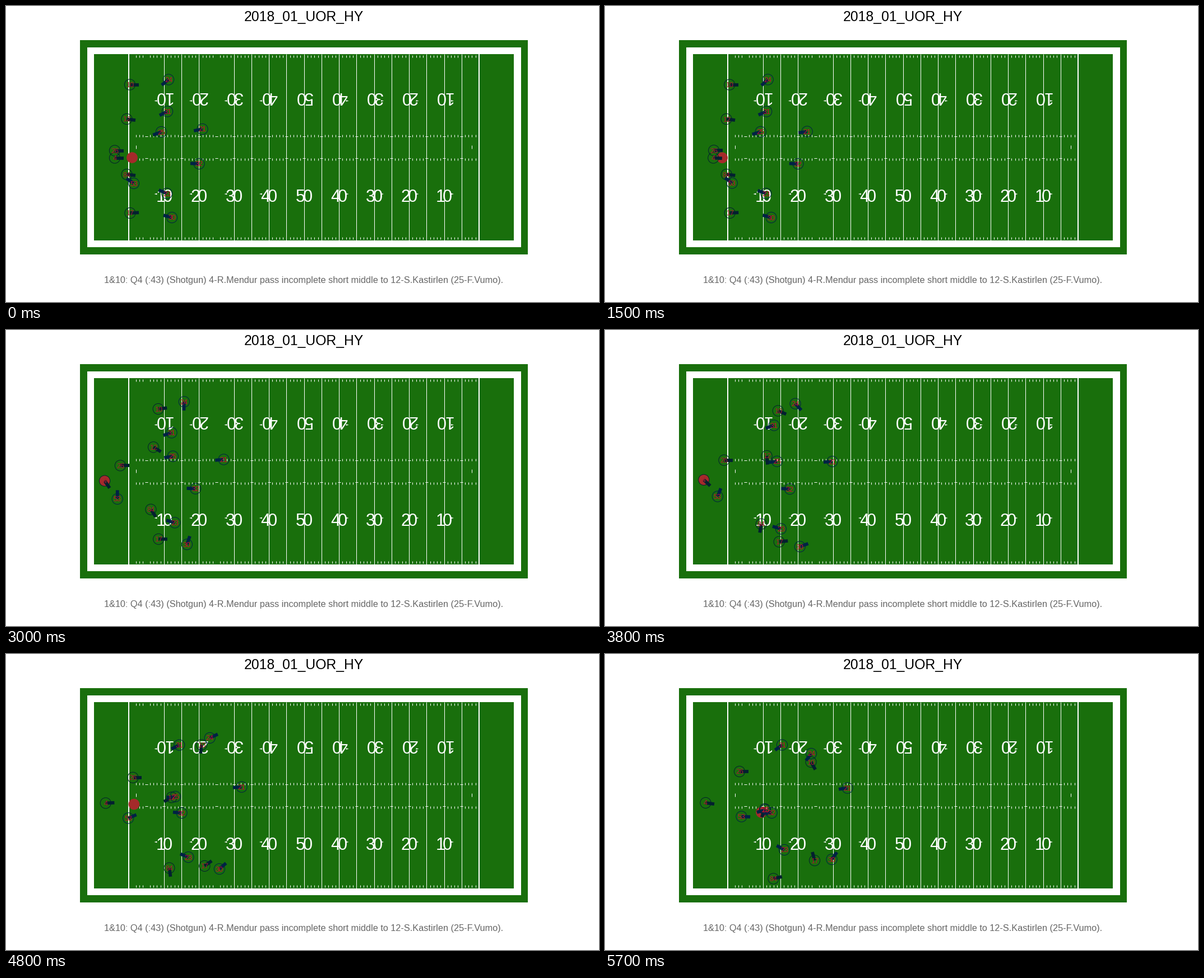
Write a matplotlib script that moves like this. It is 1058 by 529 pixels and loops after 5800 ms.

```python
import numpy as np
import matplotlib.pyplot as plt
from matplotlib.animation import FuncAnimation
from matplotlib.patches import Circle, Polygon, Rectangle

W, H, DPI = 1058, 529, 64
FRAMES, STEP = 58, 100
SNAP, THROW, DROP = 13, 44, 52     # moments of the play, in frames
PT = 72 / DPI                      # points per pixel
YARD = 6.245
GREEN, BROWN = "#196f0c", "#a52a2a"
HOME = ("#002244", "#c60c30")
AWAY = ("#03202f", "#a71930")
K = np.arange(FRAMES)

plt.rcParams["font.family"] = "Liberation Sans"
fig = plt.figure(figsize=(W / DPI, H / DPI), dpi=DPI, facecolor="white")
ax = fig.add_axes([0, 0, 1, 1])
ax.set_xlim(0, W)
ax.set_ylim(H, 0)
ax.axis("off")


def fx(yards):
    return 157 + np.asarray(yards) * YARD


def fy(yards):
    return 419 - np.asarray(yards) * YARD


def field_rect(margin, color):
    x, y = fx(-margin), fy(53.3 + margin)
    ax.add_patch(Rectangle((x, y), fx(120 + margin) - x, fy(-margin) - y,
                           fc=color, lw=0, zorder=0))


def text(x, y, s, px, color, **kw):
    opts = dict(ha="center", va="baseline", rotation_mode="anchor", zorder=2)
    opts.update(kw)
    return ax.text(x, y, s, fontsize=px * PT, color=color, **opts)


def vlines(xs, y0, y1, width=1):
    ax.vlines(xs, y0, y1, color="white", lw=width * PT, zorder=1)


def draw_field():
    for margin, color in ((4, GREEN), (2, "white"), (0, GREEN)):
        field_rect(margin, color)

    vlines(fx([y for y in range(20, 110, 5) if y != 35]), 86, 419)
    vlines(fx([10, 110]), 86, 419, 2)

    ticks = fx([y for y in range(12, 110) if y % 5])
    for top in (88, 229.5, 271.5, 413):
        vlines(ticks, top, top + 4)
    vlines(fx([12, 108]), 249, 255)
    fives = fx(np.arange(15, 110, 5))
    for y in (233, 272):
        ax.hlines([y] * len(fives), fives - 2.5, fives + 2.5,
                  color="white", lw=PT, zorder=1)

    for yard in range(20, 101, 10):
        x = float(fx(yard))
        tens = str(min(yard - 10, 110 - yard) // 10)
        for digit, dx in ((tens, -YARD), ("0", YARD)):
            text(x + dx, 350.5, digit, 30.5, "white")
            text(x - dx, 154.5, digit, 30.5, "white", rotation=180)
        side = np.sign(yard - 60)
        if side:
            base, tip = x + side * 2 * YARD, x + side * 2.8 * YARD
            for y in (169.5, 336):
                ax.add_patch(Polygon([(base, y - 1.4), (base, y + 1.4), (tip, y)],
                                     fc="white", lw=0, zorder=1))


def glide(points, start=SNAP):
    """Hold the first point, then pass the rest at even times on a smooth curve."""
    p = np.array(points, float)
    m = np.gradient(p, axis=0)
    m[0] = 0
    t = np.clip((K - start) / (FRAMES - 1 - start), 0, 1) * (len(p) - 1)
    i = np.minimum(t.astype(int), len(p) - 2)
    s = (t - i).reshape((-1,) + (1,) * (p.ndim - 1))
    return ((1 + 2 * s) * (1 - s) ** 2 * p[i] + s * (1 - s) ** 2 * m[i]
            + s * s * (3 - 2 * s) * p[i + 1] + s * s * (s - 1) * m[i + 1])


def ball_path(qb):
    """Snap to the passer, carry, then a straight throw that falls at the end."""
    spot, fall = np.array([225, 271]), np.array([279, 283])
    snap = np.clip((K - SNAP + 1) / 6, 0, 1)[:, None]
    fly = np.clip((K - THROW) / (DROP - THROW), 0, 1)
    fly = np.stack([fly, fly ** 3], axis=1)
    held = spot + (qb - spot) * snap
    return held + (fall - held) * fly


def watch(path):
    """Zone defenders look halfway between the backfield and the ball."""
    dx, dy = (ball_track - path).T
    return (180 + np.degrees(np.arctan2(dy, dx)) % 360) / 2


class Player:
    def __init__(self, number, team, path, turn=None, start=SNAP):
        line, ink = team
        self.path = glide(path, start)
        self.angle = np.radians(glide(turn) if turn else watch(self.path))
        self.ring = ax.add_patch(Circle((0, 0), 9.6, fill=False, ec=line,
                                        lw=PT, zorder=4))
        self.bar, = ax.plot([], [], color=line, lw=5.8 * PT,
                            solid_capstyle="butt", zorder=5)
        self.label = text(0, 0, str(number), 12.5, ink, zorder=6)

    def move(self, k):
        (x, y), a = self.path[k], self.angle[k]
        r = 2.5 * YARD
        self.ring.center = x, y
        self.bar.set_data([x, x + r * np.cos(a)], [y, y + r * np.sin(a)])
        self.label.set_position((x, y + 4.5))


draw_field()
text(531, 26.5, "2018_01_UOR_HY", 24.7, "black")
text(531, 494.5, "1&10: Q4 (:43) (Shotgun) 4-R.Mendur pass incomplete short "
     "middle to 12-S.Kastirlen (25-F.Vumo).", 16.28, "#666666")

passer = [(194, 271.5), (177, 270), (177, 267), (179.5, 266)]
ball_track = ball_path(glide(passer))
ball = ax.add_patch(Circle((0, 0), 9.8, fc=BROWN, lw=0, zorder=3))

players = [
    # offence: routes, with the way each runner turns
    Player(4, AWAY, passer, [0, 42, 55, 0, 8]),
    Player(26, AWAY, [(194, 258.5), (209, 236), (240, 210)], [0, 0]),
    Player(10, AWAY, [(221, 140.5), (246.5, 142), (295, 142), (343, 157),
                      (367.5, 193)], [0, 0, 0, 95, 60]),
    Player(17, AWAY, [(221.5, 370), (247, 370), (296, 377), (348, 380),
                      (374, 369)], [-3, 0, -3, -25, -105]),
    Player(12, AWAY, [(215.5, 202), (238.5, 204.5), (282, 217), (296, 251),
                      (285, 277)], [8, 10, 60, 150, 110]),
    Player(84, AWAY, [(215.5, 301), (239.5, 307), (273, 336), (289, 377),
                      (300.5, 401.5)], [7, 14, 90, 95, -13]),
    # rusher and cornerbacks
    Player(53, HOME, [(228, 317), (200, 303.5), (206, 295.5), (243.5, 290.5)],
           [214, 260, 280, 330, 362]),
    Player(24, HOME, [(290, 131.5), (304, 130), (331, 129), (361, 145),
                      (368, 178)], [141, 94, 80, -38, 127]),
    Player(30, HOME, [(296, 378), (308, 379.5), (338, 386), (375, 386.5),
                      (404.5, 367)], [195, 225, 335, 321, 306]),
    # zone defenders
    Player(31, HOME, [(288, 188.5), (294, 186), (305, 165), (316, 162.5)]),
    Player(25, HOME, [(277, 225), (295, 224), (308, 242), (286, 278.5)]),
    Player(21, HOME, [(350.5, 220), (366, 226), (405.5, 235), (432.5, 239.5)],
           start=0),
    Player(32, HOME, [(344.5, 282), (333.5, 284), (297.5, 284)]),
    Player(23, HOME, [(287, 335), (293, 337.5), (309, 351), (325, 364),
                      (320, 350)]),
]


def draw(k):
    ball.center = ball_track[k]
    for p in players:
        p.move(k)
    return []


anim = FuncAnimation(fig, draw, frames=FRAMES, interval=STEP,
                     init_func=lambda: draw(0), repeat=True, repeat_delay=0)
plt.show()
```
